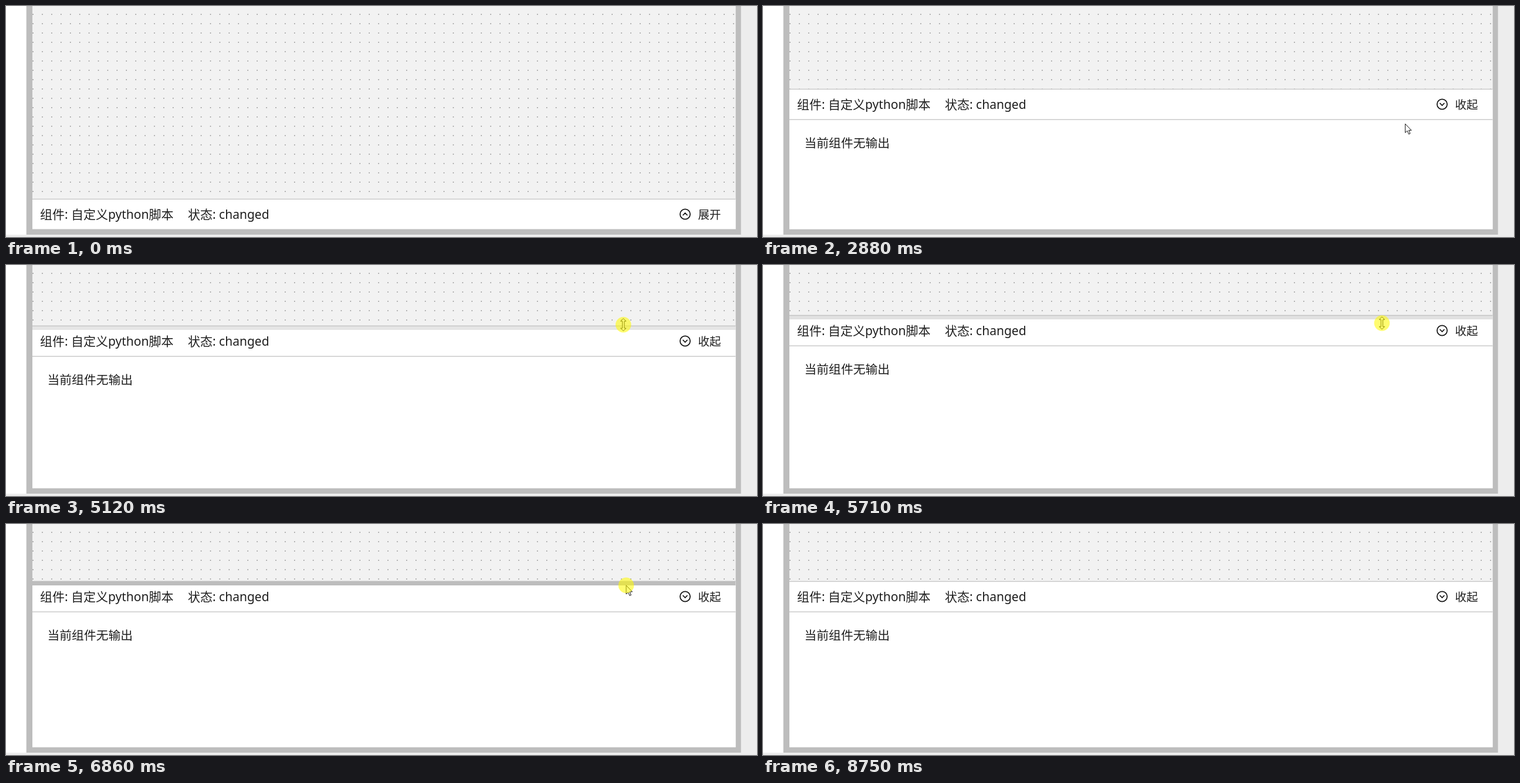
An HTML page with a canvas for the animation above (9.22 s loop, 1280 by 395 pixels).

```html
<!DOCTYPE html>
<html lang="zh-CN">
<head>
<meta charset="utf-8">
<title>组件输出面板</title>
<style>
  html, body { margin: 0; width: 100%; height: 100%; overflow: hidden; background: #fff; }
  canvas { display: block; width: 1280px; height: 395px; }
</style>
</head>
<body>
<canvas id="stage"></canvas>
<script>
const W = 1280, H = 395, LOOP = 9220;
const LEFT = 45, RIGHT = 1243.7, BOTTOM = 381.7;
const GREY = '#bdbdbd', INK = '#1f1f1f';
const FONT = '"Noto Sans", "Noto Sans CJK SC", "Noto Sans CJK", sans-serif';

const canvas = document.getElementById('stage');
const ctx = canvas.getContext('2d');
const dpr = window.devicePixelRatio || 1;
canvas.width = W * dpr;
canvas.height = H * dpr;

// Each move glides the cursor to a point in a few visible steps
const move = (start, end, steps, x, y, power = 1.5) => ({ start, end, steps, x, y, power });
const origin = { x: 1215, y: 400 };
const moves = [
  move(440, 710, 5, 1128, 235, 1),
  move(1040, 1670, 10, 1180, 356),
  move(2200, 2470, 5, 1180, 356),
  move(2610, 3360, 11, 1065, 148, 3),
  move(3560, 3630, 2, 1061, 148),
  move(3900, 4530, 10, 1049, 148),
  move(4990, 5310, 6, 1054, 77),
  move(5640, 5990, 6, 1056, 126),
  move(6650, 6860, 4, 1057, 104.9, 3),
  move(6930, 7540, 9, 1178, 119),
  move(7610, 7680, 2, 1181, 119),
  move(8340, 8750, 7, 1195, 405, 1)
];

// Progress marks: move number plus the fraction completed
const EXPAND = 2.5, GRAB = 5.05, PRESS = 5.85, DRAG = 6, DROP = 9;
const LAG = 0.11, GRIP = 6.5;

const shapes = {
  arrow: new Path2D('M0 0V15L3.5 11.8L6 17.6L8.4 16.5L6 11H10.5Z'),
  hand: new Path2D('M-2 13V1.5Q-2 -.5 0 -.5T2 1.5V8Q5 6.5 5.5 9Q8 8 8.2 10.5Q10 10 10 12V15Q10 18 8 21.5H-1Q-2 19 -6.5 13.5Q-7.5 11 -5 11.3L-2 13Z'),
  resize: new Path2D('M0 -10.5L4.7 -6H1.6V6H4.7L0 10.5L-4.7 6H-1.6V-6H-4.7Z')
};

const clamp = (v, lo = 0, hi = 1) => Math.min(hi, Math.max(lo, v));
const between = (v, lo, hi) => v >= lo && v < hi;

function progressAt(ms) {
  const i = moves.findLastIndex(m => ms >= m.start);
  if (i < 0) return 0;
  const { start, end, steps } = moves[i];
  const step = Math.floor((ms - start) / (end - start) * (steps - 1) + 1e-6);
  return i + Math.min(steps, step + 1) / steps;
}

function cursorAt(at) {
  const i = Math.min(Math.floor(at), moves.length - 1);
  const from = moves[i - 1] || origin, to = moves[i];
  const eased = 1 - (1 - (at - i)) ** to.power;
  return { x: from.x + (to.x - from.x) * eased, y: from.y + (to.y - from.y) * eased };
}

// Once expanded, the panel trails the cursor while it is dragged
function panelTop(at) {
  if (at < EXPAND) return 330;
  return Math.round(cursorAt(clamp(at - LAG, DRAG, DROP)).y - GRIP);
}

// The resize bar fades in and out, and dims when the cursor runs ahead of it
function barAlpha(at, gap) {
  const shown = clamp((at - 5.1) / 0.4) * clamp(1 - (at - DROP) / 0.4);
  const dim = between(at, DRAG, DROP) ? 0.08 * Math.abs(gap) : 0;
  return shown * clamp(1 - dim, 0.4);
}

function rect(x, y, w, h, color) {
  ctx.fillStyle = color;
  ctx.fillRect(x, y, w, h);
}

function text(str, x, y, size = 21) {
  ctx.font = `${size}px ${FONT}`;
  ctx.fillStyle = INK;
  ctx.fillText(str, x, y);
}

function drawFrame() {
  rect(0, 0, W, H, '#fff');
  rect(1252, 0, W - 1252, H, '#ededed');
  rect(0, 391, W, 4, '#ededed');
  rect(34.7, 0, 1218, 391, GREY);
  rect(LEFT, 0, RIGHT - LEFT, BOTTOM, '#f2f2f2');
}

function drawDots() {
  for (let row = 0; row < 20; row++)
    for (let col = 0; col < 76; col++)
      rect(45.3 + col * 15.92, 13.6 + row * 15.94, 1.5, 1.5, '#858585');
}

function drawIcon(y, open) {
  const d = open ? 2 : -2;
  ctx.strokeStyle = '#111';
  ctx.lineWidth = 1.7;
  ctx.beginPath();
  ctx.arc(1157.5, y, 8.6, 0, Math.PI * 2);
  ctx.moveTo(1153.6, y - d);
  ctx.lineTo(1157.5, y + d);
  ctx.lineTo(1161.4, y - d);
  ctx.stroke();
}

function drawPanel(top, bar, hover) {
  const width = RIGHT - LEFT, open = top < 330, edge = top - 0.4;
  rect(LEFT, edge, width, BOTTOM - edge, '#fff');
  rect(LEFT, edge, width, 1.2, GREY);
  rect(LEFT, edge + 52, width, 1.2, GREY);
  ctx.globalAlpha = bar;
  rect(LEFT, edge, width, 7.4, GREY);
  ctx.globalAlpha = 1;
  if (hover) {
    ctx.fillStyle = '#f2f2f2';
    ctx.beginPath();
    ctx.roundRect(1134, top + 7, 97, 38, 4);
    ctx.fill();
  }
  text('组件: 自定义python脚本', 58, top + 34);
  text('状态: changed', 310, top + 34);
  drawIcon(top + 26, open);
  text(open ? '收起' : '展开', 1179.5, top + 33.5, 19.5);
  if (open) text('当前组件无输出', 70.5, top + 100, 20.8);
}

function drawCursor(kind, x, y) {
  ctx.save();
  ctx.translate(x, y);
  ctx.fillStyle = '#fff';
  ctx.strokeStyle = '#111';
  ctx.lineJoin = 'round';
  ctx.fill(shapes[kind]);
  ctx.stroke(shapes[kind]);
  ctx.restore();
}

function drawPress(x, y) {
  ctx.fillStyle = 'rgba(255, 250, 0, 0.56)';
  ctx.beginPath();
  ctx.arc(x, y, 13.3, 0, Math.PI * 2);
  ctx.fill();
}

function draw(ms) {
  const at = progressAt(ms);
  const { x, y } = cursorAt(at);
  const top = panelTop(at);
  const hover = between(x, 1134, 1231) && between(y, top + 7, top + 45);
  const resizing = between(at, GRAB, DROP);
  const pressed = between(at, 2.1, EXPAND) || between(at, PRESS, DROP + 0.05);

  ctx.setTransform(dpr, 0, 0, dpr, 0, 0);
  drawFrame();
  ctx.save();
  ctx.beginPath();
  ctx.rect(LEFT, 0, RIGHT - LEFT, BOTTOM);
  ctx.clip();
  drawDots();
  drawPanel(top, barAlpha(at, y - top - GRIP), hover);
  ctx.restore();
  ctx.lineWidth = 1;
  drawCursor(resizing ? 'resize' : hover ? 'hand' : 'arrow', x, y);
  if (pressed) drawPress(x, y);
}

const began = performance.now();
function tick() {
  draw((performance.now() - began) % LOOP);
  requestAnimationFrame(tick);
}
tick();
</script>
</body>
</html>
```
